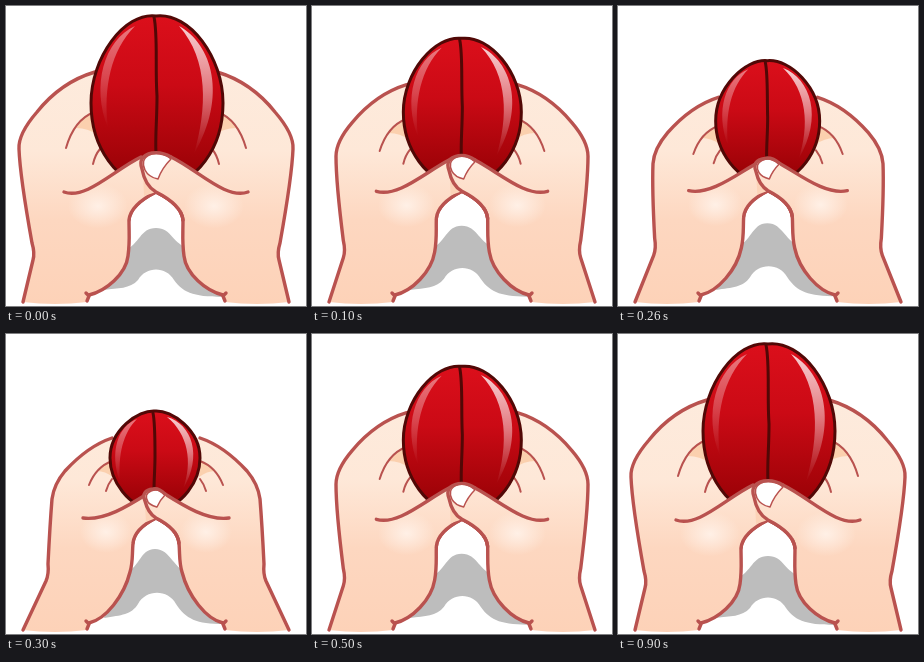
Animation of 300x300 px, one loop 1.1 s. Source, as an HTML page:

```html
<!DOCTYPE html>
<html lang="en">
<head>
<meta charset="utf-8">
<title>Squeeze</title>
<style>
  html, body { margin: 0; width: 100%; height: 100%; overflow: hidden; background: #fff; }
  svg { display: block; width: 100%; height: 100%; }
  path { stroke-linecap: round; stroke-linejoin: round; }
  .line { fill: none; stroke: #b9524f; stroke-width: 3.4; }
  .crease { fill: none; stroke: #b9524f; stroke-width: 2; }
  .skin { fill: url(#skin); }
  .glow { fill: url(#glow); }
</style>
</head>
<body>
<svg viewBox="0 0 300 300">
  <defs>
    <linearGradient id="skin" gradientUnits="userSpaceOnUse" x1="0" y1="60" x2="0" y2="298">
      <stop offset="0" stop-color="#fdebdd"/>
      <stop offset=".36" stop-color="#fee8d8"/>
      <stop offset=".65" stop-color="#fdd7c0"/>
      <stop offset="1" stop-color="#fdd2b8"/>
    </linearGradient>
    <radialGradient id="glow">
      <stop offset="0" stop-color="#fff0e6"/>
      <stop offset="1" stop-color="#fff0e6" stop-opacity="0"/>
    </radialGradient>
    <linearGradient id="red" x1="0" y1="0" x2="0" y2="1">
      <stop offset="0" stop-color="#db0f1b"/>
      <stop offset=".4" stop-color="#cb0a15"/>
      <stop offset=".9" stop-color="#9c0207"/>
    </linearGradient>
    <linearGradient id="shine" x1="0" y1="0" x2="0" y2="1">
      <stop offset="0" stop-color="#fff" stop-opacity=".8"/>
      <stop offset=".5" stop-color="#fff" stop-opacity=".45"/>
      <stop offset="1" stop-color="#fff" stop-opacity="0"/>
    </linearGradient>
  </defs>

  <!-- Each path blends from d (released) to data-to (squeezed). -->
  <path fill="#bdbdbd"
    d="M98 284 L118 245 C134 238 134 222 150 222 C166 222 166 238 184 243 L222 291 C190 291 178 288 168 274 C160 260 140 260 132 274 C124 283 112 282 98 284Z"
    data-to="M98 284 L116 240 C134 236 133 215 149 215 C165 215 167 236 186 241 L218 290 C190 290 180 285 170 270 C162 255 140 255 132 270 C125 281 116 281 98 284Z"/>

  <g id="palm">
    <path class="skin"
      d="M17 296 L27 254 Q29 247 26 237 Q14 170 13 143 Q12 128 31 106 Q55 76 89 66 L150 67 L150 186 C132 195 124 204 123 214 C123 228 124 236 122 250 C120 268 100 285 83 289 L81 296 Q49 300 17 296Z"
      data-to="M17 296 L40 247 Q43 240 42 230 Q44 190 46 165 Q48 150 59 137 Q82 112 106 104 L150 106 L150 184 C136 191 128 200 127 209 C126 222 127 228 124 238 C118 262 100 285 83 289 L81 296 Q49 300 17 296Z"/>
    <path fill="#fbd0ae"
      d="M70 122 Q77 109 89 105 L94 130 Q82 122 70 122Z"
      data-to="M91 137 Q97 129 106 127 L107 143 Q99 137 91 137Z"/>
    <path class="crease" d="M60 142 Q68 114 88 106" data-to="M83 151 Q90 133 106 127"/>
    <path class="crease" d="M87 158 Q89 149 94 143" data-to="M100 157 Q102 150 106 145"/>
    <path class="line"
      d="M17 296 L27 254 Q29 247 26 237 Q14 170 13 143 Q12 128 31 106 Q55 76 89 66"
      data-to="M17 296 L40 247 Q43 240 42 230 Q44 190 46 165 Q48 150 59 137 Q82 112 106 104"/>
    <path class="line"
      d="M150 186 C132 195 124 204 123 214 C123 228 124 236 122 250 C120 268 100 285 83 289"
      data-to="M150 184 C136 191 128 200 127 209 C126 222 127 228 124 238 C118 262 100 285 83 289"/>
    <path class="line" d="M80 287 L83 290 L81 295" data-to="M80 287 L83 290 L81 295"/>
  </g>
  <use href="#palm" transform="matrix(-1 0 0 1 300 0)"/>

  <path fill="url(#red)" stroke="#510806" stroke-width="3"
    d="M150 10 C118 6 85 52 85 97 C85 140 110 180 150 182 C192 180 217 140 217 97 C217 52 184 6 150 10Z"
    data-to="M149 77 C132 76 104 96 104 124 C104 146 122 174 149 176 C177 174 194 146 194 124 C194 96 166 76 149 77Z"/>
  <path fill="none" stroke="#510806" stroke-width="3"
    d="M148 11 C152 30 149 60 151 90 C151 115 149 130 150 148"
    data-to="M147 79 C149 88 149 105 149 122 C149 135 148 145 148 156"/>
  <path fill="url(#shine)" opacity=".55"
    d="M129 20 C98 34 85 80 102 122 C97 82 105 44 129 20Z"
    data-to="M131 85 C112 92 103 118 114 148 C112 120 117 99 131 85Z"/>
  <path fill="url(#shine)"
    d="M173 20 C206 38 222 90 188 148 C201 103 203 54 173 20Z"
    data-to="M161 83 C186 90 197 122 177 155 C187 128 182 100 161 83Z"/>

  <g id="thumb">
    <path class="skin"
      d="M58 186 C80 194 108 164 135 151 L150 155 L150 186 C132 195 124 204 123 214 L100 220Z"
      data-to="M77 184 C98 187 122 172 141 160 L150 164 L150 184 C136 191 128 200 127 209 L105 218Z"/>
    <path class="glow"
      d="M62 200 C62 170 122 170 122 200 C122 230 62 230 62 200Z"
      data-to="M74 198 C74 170 126 170 126 198 C126 226 74 226 74 198Z"/>
    <path class="line" d="M58 186 C80 194 108 164 135 151" data-to="M77 184 C98 187 122 172 141 160"/>
    <path class="line"
      d="M150 186 C132 195 124 204 123 214"
      data-to="M150 184 C136 191 128 200 127 209"/>
  </g>
  <path fill="#fcd3b8"
    d="M137 166 L138 190 L150 186Z"
    data-to="M139 172 L140 188 L150 184Z"/>
  <use href="#thumb" transform="matrix(-1 0 0 1 300 0)"/>

  <path class="skin"
    d="M165 151 C160 148 153 146 146 147 C136 149 133 155 136 163 C138 174 143 182 150 186 C168 195 176 204 177 214Z"
    data-to="M159 160 C155 156 151 154 147 155 C139 156 136 160 139 167 C141 175 145 181 150 184 C164 191 172 200 173 209Z"/>
  <path fill="#fff" stroke="#b9524f" stroke-width="1.5"
    d="M165 153 C158 147 149 146 143 149 C137 152 136 158 139 164 C142 170 147 172 152 173 Q156 162 165 153Z"
    data-to="M159 161 C155 156 150 155 145 157 C140 159 139 163 142 168 C144 171 148 172 151 173 Q154 166 159 161Z"/>
  <path class="line"
    d="M165 151 C160 148 153 146 146 147 C136 149 133 155 136 163 C138 174 143 182 150 186 C168 195 176 204 177 214"
    data-to="M159 160 C155 156 151 154 147 155 C139 156 136 160 139 167 C141 175 145 181 150 184 C164 191 172 200 173 209"/>
</svg>

<script>
  const LOOP = 1100, STEP = 100, PEAK = 3;
  const number = /-?\d+(\.\d+)?/g;

  const parts = [...document.querySelectorAll('path[data-to]')].map(path => ({
    path,
    open: path.getAttribute('d'),
    tight: path.dataset.to.match(number).map(Number)
  }));

  function pose(amount) {
    for (const { path, open, tight } of parts) {
      let i = 0;
      path.setAttribute('d', open.replace(number, n => +n + (tight[i++] - n) * amount));
    }
  }

  let shown = -1;
  function tick() {
    const step = Math.floor(performance.now() % LOOP / STEP);
    const level = Math.max(0, PEAK - Math.abs(step - PEAK));
    if (level !== shown) pose((shown = level) / PEAK);
    requestAnimationFrame(tick);
  }
  tick();
</script>
</body>
</html>
```
